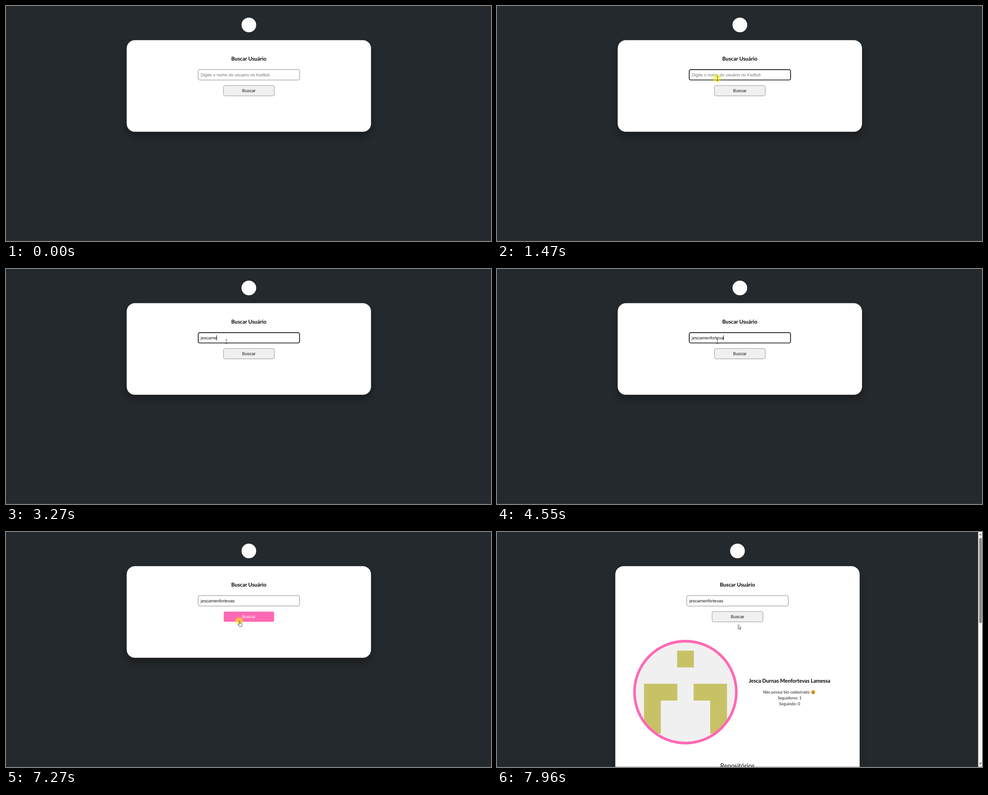
An HTML page for the animation above (8000 ms loop, 1076 by 521 pixels).

```html
<!DOCTYPE html>
<html lang="pt-BR">
<head>
<meta charset="utf-8">
<title>Buscar Usuário</title>
<style>
  html, body { margin: 0; width: 100%; height: 100%; overflow: hidden; background: #24292d; }
  svg { display: block; width: 100vw; height: 100vh; text-rendering: geometricPrecision; }
  .field { font: 9.63px "Liberation Sans", Arial, sans-serif; }
  .title { font: 700 11.7px Lato, sans-serif; text-anchor: middle; }
  .bio { font: 400 9px Lato, sans-serif; text-anchor: middle; fill: #1c1c1c; }
  .repos { font: 400 14px Lato, sans-serif; text-anchor: middle; fill: #111; }
  .cursor { fill: #fff; stroke: #3a3a3a; stroke-width: .9; stroke-linejoin: round; }
</style>
</head>
<body>
<svg viewBox="0 0 1076 521">
  <defs>
    <filter id="shadow" x="-20%" y="-30%" width="140%" height="170%">
      <feDropShadow dx="0" dy="10" stdDeviation="10" flood-color="#000" flood-opacity=".32"/>
    </filter>
    <clipPath id="round"><circle cx="418" cy="355" r="112"/></clipPath>
  </defs>
  <rect width="1076" height="521" fill="#24292d"/>

  <g id="page">
    <circle cx="538.8" cy="42" r="16.3" fill="#fff"/>
    <rect id="card" x="267.8" y="75.8" width="542" height="203" rx="18" fill="#fff" filter="url(#shadow)"/>
    <text class="title" x="538.7" y="121">Buscar Usuário</text>
    <rect id="input" fill="#fff"/>
    <text id="value" class="field" x="432" y="155.6"></text>
    <rect id="caret" y="147" width="1" height="11" fill="#111"/>
    <rect id="button"/>
    <text id="label" class="field" x="538.8" y="190.5" text-anchor="middle">Buscar</text>
  </g>

  <g id="result">
    <g clip-path="url(#round)">
      <circle cx="418" cy="355" r="113" fill="#f0f0f0"/>
      <path fill="#c8c267" d="M399.6 263h37.2v37.2h-37.2z
        M326.2 336.6h74v37.2h-36.8v73.4h-37.2z M436.2 336.6h74v110.6h-37.2v-73.4h-36.8z"/>
    </g>
    <circle cx="418" cy="355" r="113" fill="none" stroke="#ff69b4" stroke-width="5.8"/>
    <text class="title" x="649" y="334" letter-spacing="-.1">Jesca Durnas Menfortevas Lamessa</text>
    <text class="bio" x="641.5" y="358">Não possui bio cadastrada</text>
    <g transform="translate(701.4 355)">
      <circle r="4.7" fill="#f8b83c"/>
      <path d="M-3-1.8L-1-.9L-3-.2M3-1.8L1-.9L3-.2" fill="none" stroke="#6b4420" stroke-width=".8"/>
      <ellipse cy="2.2" rx="1.8" ry="1.4" fill="#8a4a2a"/>
    </g>
    <text class="bio" x="649.5" y="371">Seguidores: 1</text>
    <text class="bio" x="649.3" y="384">Seguindo: 0</text>
    <text class="repos" x="533.5" y="523.3">Repositórios</text>
    <rect x="1067.5" width="8.5" height="521" fill="#fafafa"/>
    <rect x="1069.6" y="13" width="6" height="189" rx="3" fill="#8b8b8b"/>
    <path fill="#8b8b8b" d="M1069.4 7.2h6.4l-3.2-4.6zM1069.4 511.6h6.4l-3.2 4.6z"/>
  </g>

  <path d="M0 520.5H1076" stroke="#4a4346" stroke-opacity=".45"/>
  <path d="M0 517q.3 3.7 4 4H0z" fill="#4a4346"/>

  <circle id="click" r="8.7" fill="#fff000" fill-opacity=".55"/>
  <g id="pointer">
    <path id="arrow" class="cursor" d="M0 0V9.6L2.2 7.6L3.8 10.9L5.3 10.2L3.8 7H6.6z"/>
    <path id="hand" class="cursor" d="M-.7.6Q.1-.5 .9.6V4.2Q2-.0 2.8 4.4Q3.9 3.5 4.4 4.9Q5.5 4.3 5.8 5.6V8.2Q5.6 9.8 4.6 11.8H-.2Q-1.2 9.6-3 7.6Q-3.5 6-2.2 6.1L-.7 7.4z"/>
    <path id="beam" fill="none" stroke="#4a4a4a" stroke-width=".9" d="M-2-4.8Q0-4.8 0-3.8Q0-4.8 2-4.8M0-3.8V3.8M-2 4.8Q0 4.8 0 3.8Q0 4.8 2 4.8"/>
  </g>
</svg>
<script>
const LOOP = 8000, LOADED = 7420;
const USER = 'jescamenfortevas';
const HINT = 'Digite o nome do usuário no Kedlub';
const KEYS = [2400, 2540, 2800, 2930, 3060, 3200, 3270, 3490,
              3610, 3760, 3950, 4150, 4350, 4410, 4550, 5470];
const CARET = [[1540, 2070], [2400, 5070], [5470, 6010], [6520, 7070]];
const HOVER = [[670, 880], [6860, 7960]];
const CLICKS = [[1470, 1610], [7270, LOADED]];

const el = id => document.getElementById(id);
const set = (id, attrs) => {
  for (const name in attrs) el(id).setAttribute(name, attrs[name]);
};
const show = (id, on) => set(id, { visibility: on ? 'visible' : 'hidden' });
const within = (t, spans) => spans.some(([a, b]) => t >= a && t < b);
const mix = (a, b, u) => a + (b - a) * u;
// Pointer positions are sampled in discrete steps.
const steps = (t, start, gap, count) =>
  Math.max(0, Math.min(1, Math.floor((t - start) / gap) / count));

function pointerAt(t) {
  if (t < 190) return { kind: 'none', x: 0, y: 0 };
  if (t < 880) {
    const e = 1 - (1 - steps(t, 190, 67.7, 9)) ** 2;
    return { kind: t >= 670 && t < 740 ? 'hand' : 'arrow', x: mix(1012, 489, e), y: mix(511, 163, e) };
  }
  if (t < 6720) return { kind: 'beam', x: 489, y: 161 };
  if (t < 7820) {
    const u = steps(t, 6650, 70, 4);
    return { kind: u < .5 ? 'arrow' : 'hand', x: mix(489, 518, u), y: mix(161, 198, u) };
  }
  const u = steps(t, 7750, 70, 3);
  return { kind: 'arrow', x: mix(518, 535, u), y: mix(198, 205.5, u) };
}

function drawForm(t) {
  const typed = KEYS.filter(k => t >= k).length;
  const value = el('value');
  value.textContent = typed ? USER.slice(0, typed) : HINT;
  value.setAttribute('fill', typed ? '#151515' : '#757575');
  set('caret', { x: typed ? Math.round(431.6 + value.getComputedTextLength()) : 432 });
  show('caret', within(t, CARET));

  const focus = t >= 1470 && t < 7270;
  set('input', focus
    ? { x: 426.5, y: 141.2, width: 224.8, height: 22.8, rx: 3.6, stroke: '#101010', 'stroke-width': 1.7 }
    : { x: 426.3, y: 140.9, width: 225.2, height: 23.2, rx: 3.8, stroke: '#767676', 'stroke-width': .9 });

  const hover = within(t, HOVER);
  set('button', hover
    ? { x: 483, y: 176.5, width: 111.8, height: 22.4, rx: 3.2, fill: '#ff69b4', stroke: 'none' }
    : { x: 482.5, y: 176.2, width: 112.8, height: 23, rx: 3.6, fill: '#f0f0f0', stroke: '#8a8a8a', 'stroke-width': .9 });
  set('label', { fill: hover ? '#fff' : '#151515' });
}

function draw(t) {
  const loaded = t >= LOADED;
  set('page', { transform: `translate(${loaded ? -5.3 : 0} 0)` });
  set('card', { height: loaded ? 640 : 203 });
  show('result', loaded);
  drawForm(t);

  const p = pointerAt(t);
  set('pointer', { transform: `translate(${p.x} ${p.y})` });
  for (const kind of ['arrow', 'hand', 'beam']) show(kind, p.kind === kind);
  set('click', { cx: p.x - .8, cy: p.y - .6 });
  show('click', within(t, CLICKS));
}

const start = performance.now();
function frame() {
  draw((performance.now() - start) % LOOP);
  requestAnimationFrame(frame);
}
frame();
</script>
</body>
</html>
```
